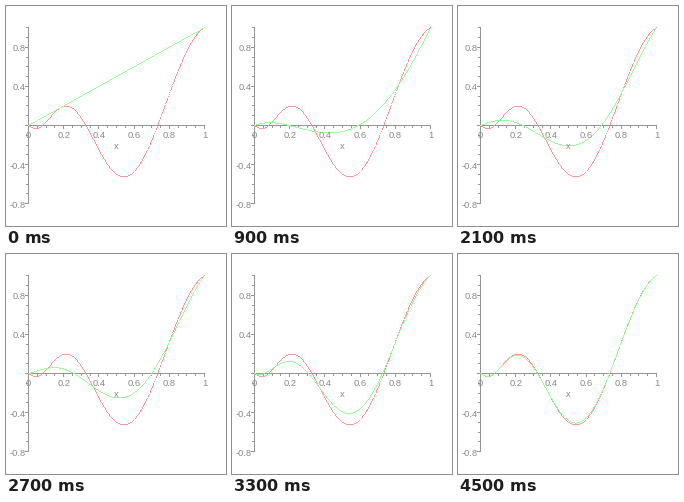
A matplotlib script that plays this animation: 220x220 px, repeating every 6 s.

```python
import math

import numpy as np
import matplotlib.pyplot as plt
from matplotlib.animation import FuncAnimation

SIZE, DPI = 220, 100
GREY, RED, GREEN = (148, 148, 148), (255, 148, 148), (148, 255, 148)
DEGREES = [*range(1, 11), 20, 30, 40, 50, 100, 200]
HOLD = 4  # extra steps on the last degree


def sx(x):
    return 22.5 + 176 * x


def sy(y):
    return 119.5 - 97.8 * y


def f(x):
    return -x * np.sin(3.5 * np.pi * np.sqrt(x))


def bernstein(n, x):
    """Bernstein approximation of f with degree n."""
    return sum(f(k / n) * math.comb(n, k) * x**k * (1 - x) ** (n - k)
               for k in range(n + 1))


knots = np.linspace(0, 1, 99)
fine = np.linspace(0, 1, 6000)


def draw_curve(canvas, values, color):
    """Paint a crisp one-pixel curve: one dot per column, or per row if steep."""
    px, py = sx(fine), sy(np.interp(fine, knots, values))
    steep = np.abs(np.gradient(py)) > np.abs(np.gradient(px))
    major = np.where(steep, py, px)
    dots = np.abs(major % 1 - 0.5) < 0.03
    canvas[py[dots].astype(int), px[dots].astype(int)] = color


def draw_axes(canvas):
    ox, oy = int(sx(0)), int(sy(0))
    canvas[oy, ox:int(sx(1)) + 1] = GREY
    canvas[int(sy(1)):int(sy(-0.8)) + 1, ox] = GREY
    for i in range(21):
        size = 4 if i % 4 == 0 else 3
        canvas[oy:oy + size, int(sx(i / 20))] = GREY
    for i in range(-8, 11):
        size = 4 if i % 4 == 0 else 3
        canvas[int(sy(i / 10)), ox - size + 1:ox] = GREY


base = np.full((SIZE, SIZE, 3), 255, dtype=np.uint8)
draw_axes(base)
draw_curve(base, f(knots), RED)


def render(step):
    canvas = base.copy()
    n = DEGREES[min(step, len(DEGREES) - 1)]
    draw_curve(canvas, bernstein(n, knots), GREEN)
    return canvas


fig = plt.figure(figsize=(SIZE / DPI, SIZE / DPI), dpi=DPI, facecolor="white")
ax = fig.add_axes([0, 0, 1, 1])
ax.axis("off")
plot = ax.imshow(render(0), extent=(0, SIZE, SIZE, 0), interpolation="nearest")


def label(x, y, text, ha="center"):
    ax.text(x, y, text, ha=ha, va="center_baseline", color="#888888",
            family="Liberation Sans", fontsize=9.4 * 72 / DPI)


for v in (0, 0.2, 0.4, 0.6, 0.8, 1):
    label(sx(v), 128, f"{v:g}")
for v in (0.8, 0.4, -0.4, -0.8):
    label(20, sy(v) + 0.5, f"{v:g}", "right")
label(110.5, 139.5, "x")


def update(step):
    plot.set_data(render(step))
    return [plot]


anim = FuncAnimation(fig, update, frames=len(DEGREES) + HOLD, interval=300,
                     repeat=True, repeat_delay=0)
plt.show()
```
